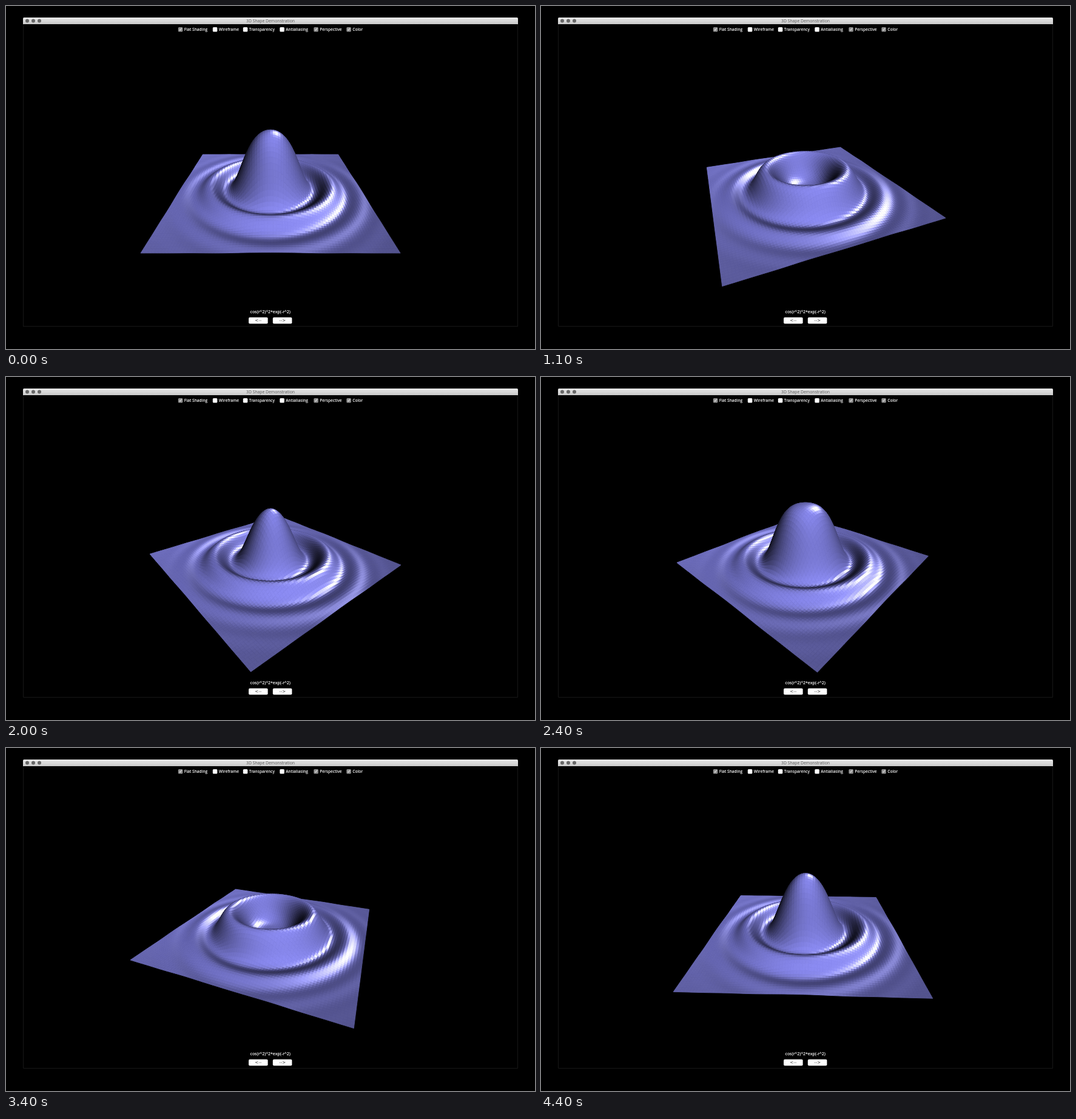
An HTML page with a canvas that plays this animation: 872x566 px, repeating every 4500 ms.

```html
<!DOCTYPE html>
<html>
<head>
<meta charset="utf-8">
<title>3D Shape Demonstration</title>
<style>
html, body { margin: 0; width: 100%; height: 100%; overflow: hidden; background: #000; }
canvas { display: block; }
</style>
</head>
<body>
<canvas id="stage" width="872" height="566"></canvas>
<script>
const ctx = document.getElementById('stage').getContext('2d');
const FONT = '"Open Sans", "Noto Sans", sans-serif';
const WIDE_FONT = '"DejaVu Sans", sans-serif';
const LOOP = 4500, STEP = 100, CELLS = 80;
const HEIGHT = 0.66, RIPPLE = 6.6, DECAY = 4.3;
const DEG = Math.PI / 180;

// Camera raised 30 degrees above the plane; the square spans -1..1
const SIN = 0.5, COS = Math.sqrt(3) / 2;
const DISTANCE = 2.751, FOCAL = 403.4, CX = 436, CY = 300.8;

function text(str, x, y, size, color, weight = 600, align = 'left', font = FONT) {
  ctx.font = `${weight} ${size}px ${font}`;
  ctx.fillStyle = color;
  ctx.textAlign = align;
  ctx.textBaseline = 'alphabetic';
  ctx.fillText(str, x, y);
}

function box(x, y, w, h, r, color) {
  ctx.fillStyle = color;
  ctx.beginPath();
  ctx.roundRect(x, y, w, h, r);
  ctx.fill();
}

function checkbox(x, label, checked) {
  box(x - 0.2, 34.9, 7.5, 7.5, 1.5, checked ? '#8e8e8e' : '#fff');
  if (checked) {
    ctx.strokeStyle = '#fff';
    ctx.lineWidth = 0.9;
    ctx.beginPath();
    ctx.moveTo(x + 1.8, 38.8);
    ctx.lineTo(x + 3, 40.3);
    ctx.lineTo(x + 5.3, 36.7);
    ctx.stroke();
  }
  text(label, x + 9.8, 41, 6.5, '#fff');
}

function button(x, label) {
  box(x, 513.7, 31.6, 10.6, 2, '#fff');
  text(label, x + 15.8, 521.4, 7, '#333', 400, 'center', WIDE_FONT);
}

function drawWindow() {
  ctx.fillStyle = '#000';
  ctx.fillRect(0, 0, 872, 566);
  ctx.strokeStyle = '#171717';
  ctx.lineWidth = 1;
  ctx.strokeRect(28.5, 19.5, 815, 509);

  const bar = ctx.createLinearGradient(0, 19, 0, 30);
  bar.addColorStop(0, '#e8e8e8');
  bar.addColorStop(1, '#c9c9c9');
  box(28, 19, 816, 11, [2, 2, 0, 0], bar);
  for (const x of [35, 45, 55]) box(x - 3, 21.5, 6, 6, 3, '#686868');
  text('3D Shape Demonstration', 436, 27.2, 6.8, '#555', 400, 'center');

  checkbox(284, 'Flat Shading', true);
  checkbox(341, 'Wireframe', false);
  checkbox(391, 'Transparency', false);
  checkbox(451.5, 'Antialiasing', false);
  checkbox(507.5, 'Perspective', true);
  checkbox(561.5, 'Color', true);

  text('cos(r^2)^2*exp(-r^2)', 435.7, 506.5, 6.9, '#fff', 600, 'center');
  button(400, '<--');
  button(439.8, '-->');
}

function vertex(gx, gy, turn, phase) {
  const r2 = gx * gx + gy * gy;
  const z = HEIGHT * Math.cos(RIPPLE * r2 - phase) ** 2 * Math.exp(-DECAY * r2);
  const x = gx * Math.cos(turn) + gy * Math.sin(turn);
  const y = gy * Math.cos(turn) - gx * Math.sin(turn);
  const scale = FOCAL / (DISTANCE - y * COS - z * SIN);
  return { x, y, z, sx: CX + x * scale, sy: CY + (y * SIN - z * COS) * scale };
}

function shade(a, b, c, d) {
  // Unit normal from the two diagonals of the cell, x right, y toward the viewer, z up
  const px = c.x - a.x, py = c.y - a.y, pz = c.z - a.z;
  const qx = d.x - b.x, qy = d.y - b.y, qz = d.z - b.z;
  let nx = py * qz - pz * qy, ny = pz * qx - px * qz, nz = px * qy - py * qx;
  const len = Math.hypot(nx, ny, nz);
  nx /= len; ny /= len; nz /= len;

  // Local light, a weak headlight and a tight highlight
  const lx = a.x + 1.1, ly = a.y + 1, lz = a.z + 2.6;
  const local = Math.abs(nx * lx + ny * ly + nz * lz) / Math.hypot(lx, ly, lz);
  const head = Math.abs(ny * COS + nz * SIN);
  const gloss = Math.max(0, 0.33 * nx + 0.22 * ny + 0.918 * nz) ** 40;

  const light = 170 * local + 90 * head ** 2 + 190 * gloss;
  const red = Math.min(255, 0.575 * light + 60 * gloss);
  return `rgb(${red | 0},${red | 0},${Math.min(255, light) | 0})`;
}

function drawSurface(step) {
  const turn = 2 * step * DEG, phase = 8 * step * DEG;
  const grid = [];
  for (let j = 0; j <= CELLS; j++) {
    grid.push([]);
    for (let i = 0; i <= CELLS; i++) {
      grid[j].push(vertex(2 * i / CELLS - 1, 2 * j / CELLS - 1, turn, phase));
    }
  }

  const faces = [];
  for (let j = 0; j < CELLS; j++) {
    for (let i = 0; i < CELLS; i++) {
      faces.push([grid[j][i], grid[j][i + 1], grid[j + 1][i + 1], grid[j + 1][i]]);
    }
  }
  faces.sort((f, g) => f[0].y + f[2].y - g[0].y - g[2].y);

  ctx.lineWidth = 0.9;
  ctx.lineJoin = 'round';
  for (const face of faces) {
    ctx.fillStyle = ctx.strokeStyle = shade(...face);
    ctx.beginPath();
    for (const p of face) ctx.lineTo(p.sx, p.sy);
    ctx.closePath();
    ctx.fill();
    ctx.stroke();
  }
}

let shown = -1;
const start = performance.now();
function tick() {
  const step = Math.floor(Math.max(0, performance.now() - start) % LOOP / STEP);
  if (step !== shown) {
    shown = step;
    drawWindow();
    drawSurface(step);
  }
  requestAnimationFrame(tick);
}
tick();
</script>
</body>
</html>
```
